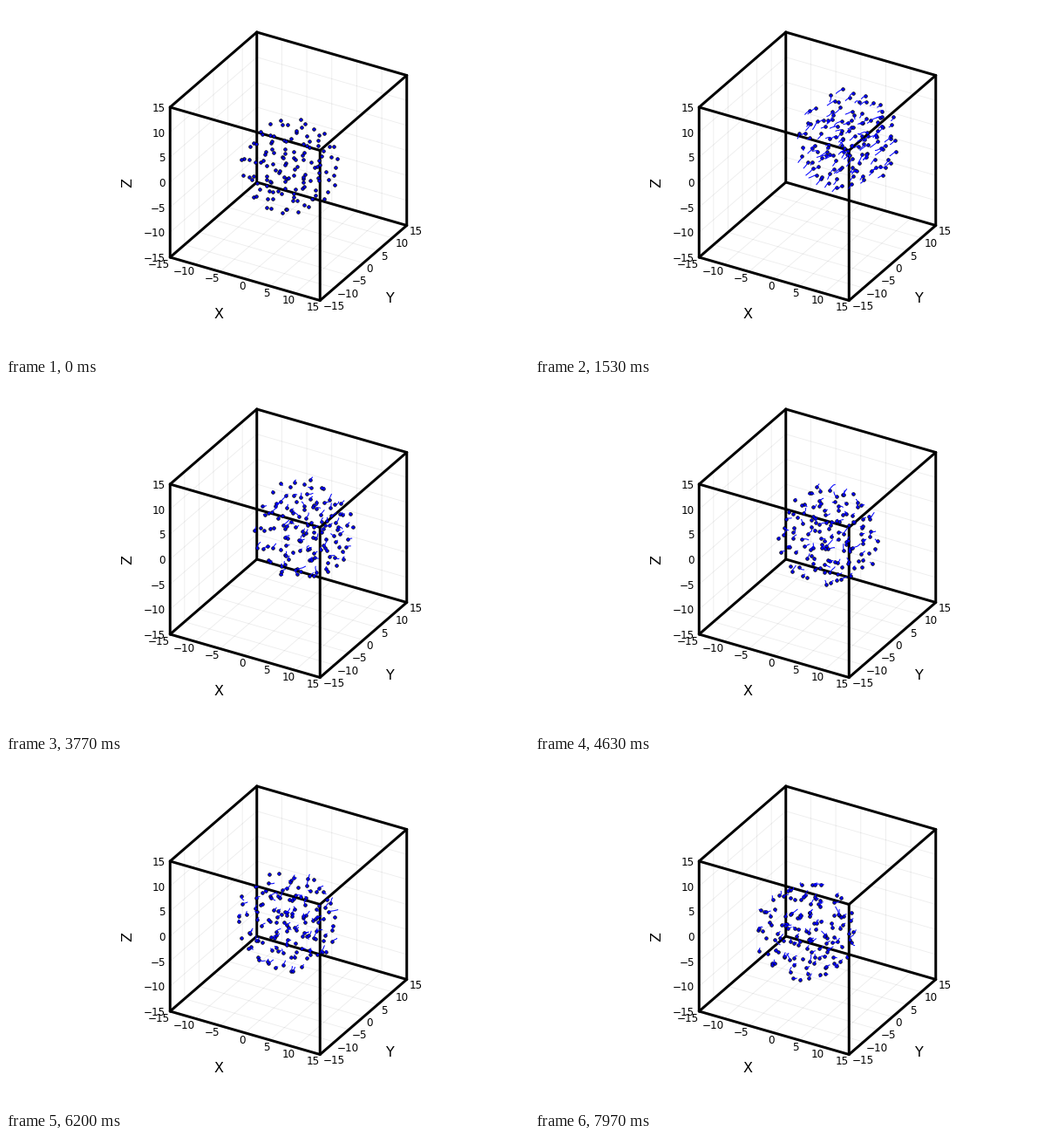
Recreate the animation shown at these times as a matplotlib script. Size 600 px wide and 400 px high, loop 8000 ms.

```python
import numpy as np
import matplotlib.pyplot as plt
from matplotlib.animation import FuncAnimation
from matplotlib.collections import LineCollection

FRAMES, LOOP = 240, 8000
DT = LOOP / 1000 / FRAMES
COUNT, RADIUS, GAP, TAIL = 130, 8.3, 3.1, 9
DPI = 100
PX = 72 / DPI
LIM = 15
TICKS = range(-15, 16, 5)

# Orthographic view: pixel shift per unit of x, y and z
VIEW = np.array([[172, 49.5], [99.5, -86], [0, -172]]) / 30
ORIGIN = np.array([324.0, 183.75])


def project(p):
    return ORIGIN + np.asarray(p, float) @ VIEW


def step(pos, vel, rng, noise):
    """Advance the swarm: soft repulsion, a round boundary and wandering."""
    diff = pos[:, None] - pos[None]
    dist = np.linalg.norm(diff, axis=2) + 1e-9
    push = np.maximum(GAP - dist, 0) / dist
    force = 14 * (push[..., None] * diff).sum(axis=1)
    r = np.linalg.norm(pos, axis=1, keepdims=True) + 1e-9
    force -= 25 * np.maximum(r - RADIUS, 0) * pos / r
    kick = noise * np.sqrt(DT) * rng.normal(size=pos.shape)
    vel = vel + (force - 2.4 * vel) * DT + kick
    vel -= vel.mean(axis=0)
    return pos + vel * DT, vel


def drift(t):
    """Swarm centre along y: a quick way out, then a slow way back."""
    k = 0.3
    out, back = 7.4 * t, 13.88 - 2.3 * t
    return -k * np.logaddexp(-out / k, -back / k)


def swarm():
    rng = np.random.default_rng(12)
    way = rng.normal(size=(COUNT, 3))
    way /= np.linalg.norm(way, axis=1, keepdims=True)
    pos = way * RADIUS * rng.random((COUNT, 1)) ** (1 / 3)
    vel = np.zeros_like(pos)
    for _ in range(60):
        pos, vel = step(pos, vel, rng, 1.0)
    path = []
    for i in range(FRAMES):
        path.append(project(pos + [0, drift(i * DT), 0]))
        pos, vel = step(pos, vel, rng, 3.2)
    return np.array(path)


fig = plt.figure(figsize=(6, 4), dpi=DPI, facecolor="white")
ax = fig.add_axes([0, 0, 1, 1])
ax.set_xlim(0, 600)
ax.set_ylim(400, 0)
ax.axis("off")


def lines(segments, **style):
    group = LineCollection([project(s) for s in segments], **style)
    group.set_snap(False)
    ax.add_collection(group, autolim=False)


def label(x, y, text, size=12, **style):
    ax.text(x, y, text, fontsize=size * PX, family="DejaVu Sans",
            va="baseline", **style)


def draw_box():
    a, b = -LIM, LIM
    grid = []
    for t in range(-10, 11, 5):
        grid += [[(t, a, a), (t, b, a)], [(t, b, a), (t, b, b)],
                 [(a, t, a), (b, t, a)], [(a, t, a), (a, t, b)],
                 [(a, a, t), (a, b, t)], [(a, b, t), (b, b, t)]]
    lines(grid, colors="black", alpha=0.07, linewidths=0.9 * PX, zorder=1)

    edges = []
    for u in (a, b):
        for v in (a, b):
            edges += [[(a, u, v), (b, u, v)], [(u, a, v), (u, b, v)],
                      [(u, v, a), (u, v, b)]]
    lines(edges, colors="black", linewidths=3 * PX, capstyle="round", zorder=2)


def draw_labels():
    for t in TICKS:
        text = str(t).replace("-", "\u2212")
        x, y = project((t, -LIM, -LIM))
        label(x, y + 11.9, text, ha="right")
        x, y = project((LIM, t, -LIM))
        label(x + 3.2, y + 10.5, text, ha="left")
        x, y = project((-LIM, -LIM, t))
        label(x - 5.4, y + 4.9, text, ha="right")
    label(244, 357.8, "X", 16, ha="center")
    label(441, 339.8, "Y", 16, ha="center")
    label(144.6, 202, "Z", 16, ha="center", rotation=90,
          rotation_mode="anchor")


draw_box()
draw_labels()
path = swarm()
dots, = ax.plot([], [], "o", ms=3.6 * PX, mfc="blue", mec="black",
                mew=0.75 * PX, zorder=3)
tails = LineCollection([], colors="blue", linewidths=PX, zorder=4)
ax.add_collection(tails, autolim=False)


def update(i):
    trail = path[max(0, i - TAIL):i + 1]
    tails.set_segments(list(trail.transpose(1, 0, 2)) if i else [])
    dots.set_data(path[i, :, 0], path[i, :, 1])
    return dots, tails


anim = FuncAnimation(fig, update, frames=FRAMES, interval=LOOP / FRAMES,
                     repeat=True, repeat_delay=0, blit=False)
plt.show()
```
